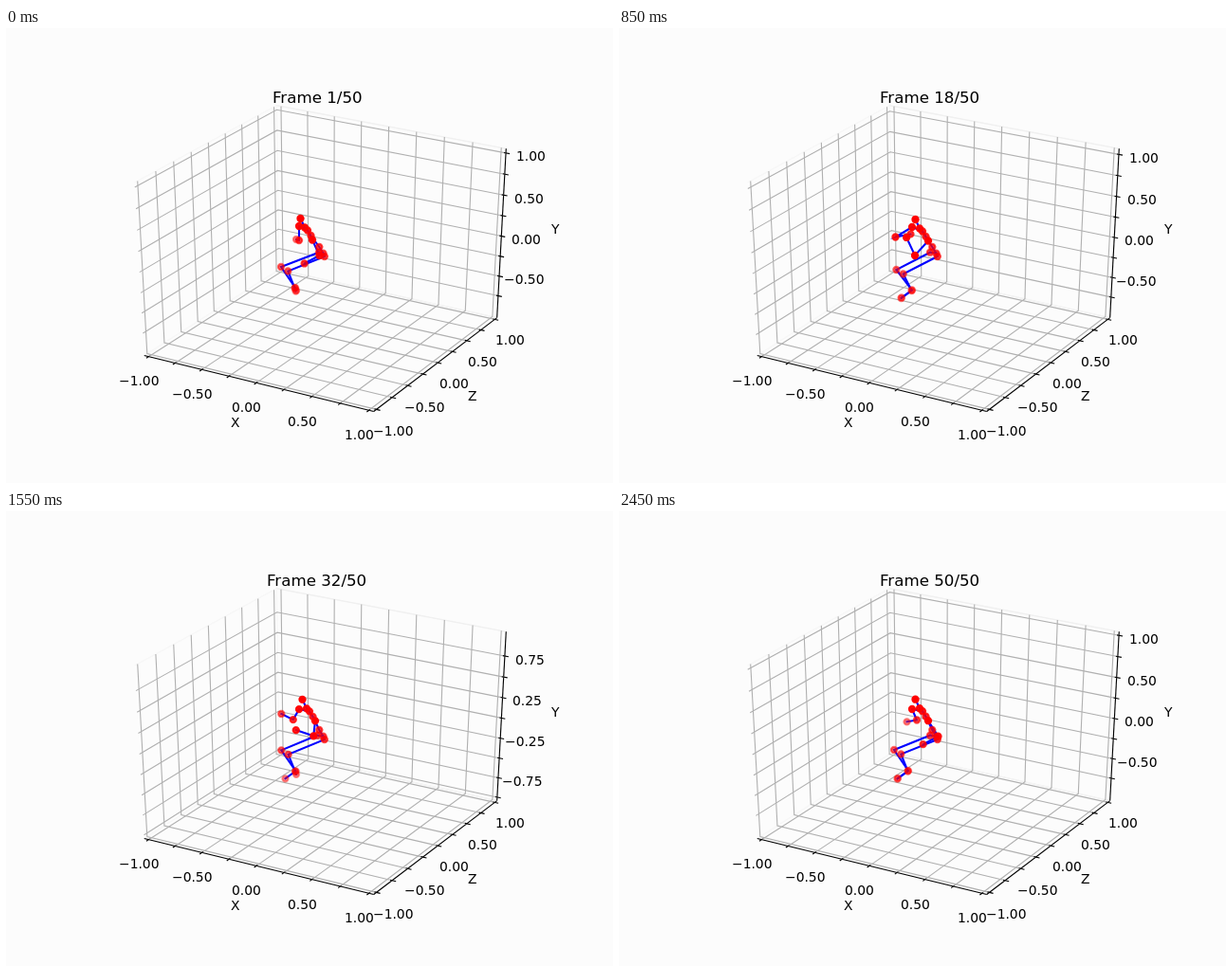
Write an HTML page with a canvas that moves like this. It is 640x480 px and loops after 2500 ms.

```html
<!DOCTYPE html>
<html lang="en">
<head>
<meta charset="utf-8">
<title>3D pose plot</title>
<style>
html, body { margin: 0; width: 100%; height: 100%; overflow: hidden; background: #fcfcfc; }
canvas { display: block; }
</style>
</head>
<body>
<canvas id="plot" width="640" height="480"></canvas>
<script>
const ctx = document.getElementById('plot').getContext('2d');
const STEP = 50, COUNT = 50;
const PT = 100 / 72;

const clamp = u => Math.max(0, Math.min(1, u));
const mix = (a, b, u) => a + (b - a) * u;
const add = ([x, y], dx, dy) => [x + dx, y + dy];

// Smooth step from 0 to 1 between two times.
function ramp(t, from, to) {
  const u = clamp((t - from) / (to - from));
  return u * u * (3 - 2 * u);
}

// Perspective view of a unit cube centred on the origin (elev 30, azim -60).
const H = Math.sqrt(3) / 2;
function project([x, y, z]) {
  const depth = 10 - (x * H / 2 - y * .75 + z / 2);
  const u = (x * H + y / 2) / depth;
  const v = (-x / 4 + y * H / 2 + z * H) / depth;
  return [80 + (u + .095) / .185 * 496, 427.2 - (v + .095) / .185 * 369.6];
}

function polyline(points, color, width, cap = 'butt') {
  ctx.beginPath();
  points.forEach(p => ctx.lineTo(p[0], p[1]));
  ctx.strokeStyle = color;
  ctx.lineWidth = width;
  ctx.lineCap = cap;
  ctx.stroke();
}
const edge = (color, width, ...pts) => polyline(pts.map(project), color, width);

// Centred text on whole pixels.
function text(str, x, baseline, size = 10) {
  ctx.font = `${size * PT}px "DejaVu Sans", sans-serif`;
  ctx.fillStyle = '#000';
  ctx.fillText(str, Math.round(x - ctx.measureText(str).width / 2), Math.round(baseline));
}

const D = 1 / 12;            // axis spacing unit
const S = .5 + D / 4;        // half size of the panes
const L = S + .8857 * D;     // tick labels
const N = S + 1.9255 * D;    // axis names
const IN = .1 * D, OUT = .2 * D;

const AXES = [
  { name: 'X', namePos: [0, -N, -N], line: [[-S, -S, -S], [S, -S, -S]],
    grid: c => [[c, -S, -S], [c, S, -S], [c, S, S]],
    tick: c => [[c, -S + IN, -S], [c, -S - OUT, -S]],
    label: c => [c, -L, -L] },
  { name: 'Z', namePos: [N, 0, -N], line: [[S, -S, -S], [S, S, -S]],
    grid: c => [[S, c, -S], [-S, c, -S], [-S, c, S]],
    tick: c => [[S - IN, c, -S], [S + OUT, c, -S]],
    label: c => [L, c, -L] },
  { name: 'Y', namePos: [N, N, 0], line: [[S, S, -S], [S, S, S]],
    grid: c => [[-S, -S, c], [-S, S, c], [S, S, c]],
    tick: c => [[S - IN, S, c], [S + OUT, S, c]],
    label: c => [L, L, c] }
];

function drawPanes() {
  edge('#f7f7f7', PT, [-S, -S, -S], [-S, S, -S], [-S, S, S], [-S, -S, S]);
  edge('#f0f0f0', PT, [-S, S, -S], [S, S, -S], [S, S, S], [-S, S, S]);
  edge('#f4f4f4', PT, [-S, -S, -S], [S, -S, -S], [S, S, -S], [-S, S, -S]);
}

function drawAxis(axis, centre) {
  const parity = centre < 0 ? 1 : 0;
  const ticks = [];
  for (let k = -5; k <= 5; k++) {
    const c = (k / 4 - centre) / 2;
    if (Math.abs(c) <= .5) ticks.push([k, c]);
  }
  edge('#000', .8 * PT, ...axis.line);
  ticks.forEach(([, c]) => edge('#b0b0b0', .8 * PT, ...axis.grid(c)));
  ticks.forEach(([k, c]) => {
    edge('#000', .8 * PT, ...axis.tick(c));
    if (Math.abs(k) % 2 !== parity) return;
    const [x, y] = project(axis.label(c));
    text((k / 4).toFixed(2).replace('-', '\u2212'), x, y + 11);
  });
  const [x, y] = project(axis.namePos);
  text(axis.name, x, y + 4);
}

// Centre of the vertical range, which follows the body.
const centreY = t => .01 + .017 * ramp(t, 550, 850) - .02 * ramp(t, 900, 1300)
  - .01 * ramp(t, 1350, 1550) + .009 * ramp(t, 1580, 1750) - .003 * ramp(t, 1800, 2400);

const armRaise = t => ramp(t, 550, 850) - ramp(t, 1380, 1720);

// The seated body leans and straightens, the arms lift and drop, the feet flick.
function pose(t) {
  const lean = ramp(t, 500, 850) - ramp(t, 1200, 1650);
  const forward = 2 * ramp(t, 500, 850);
  const rise = lean - 2.3 * ramp(t, 850, 1500);
  const raise = armRaise(t);
  const relax = ramp(t, 1380, 1720);

  const upper = (x, y) => [x + forward, y + rise];
  const p = {
    head: upper(310.5, 201),
    chin: upper(315, 210.5),
    neck: upper(318, 213.5),
    chest: upper(321.5, 219),
    spine: [330.3, 231],
    pelvis: [334.5, 237.7],
    shoulderR: [309, 209 + lean],
    shoulderL: add(upper(323, 223.5), forward / 2, 0),
    hipR: [330 - forward, 236.7],
    hipL: [335.8, 241]
  };

  p.elbowR = add(p.shoulderR, -17.5 * raise + 5 * relax, 15 - 4.5 * raise - 3.5 * relax);
  const turn = -Math.PI / 180 * (20 + 185 * clamp((t - 850) / 950) ** 1.5);
  const reach = ramp(t, 550, 850) - .4 * ramp(t, 1800, 2450);
  p.wristR = add(p.elbowR, mix(-3, 17 * Math.cos(turn), reach), mix(-1, 9 * Math.sin(turn), reach));

  p.elbowL = add(p.shoulderL, 7.5 - 21.5 * raise + 3 * relax, 16.5 - raise);
  const bend = Math.PI / 180 * (152 + 93 * raise);
  const forearm = 18 + 3 * raise;
  p.wristL = add(p.elbowL, forearm * Math.cos(bend), forearm * Math.sin(bend));

  const leg = (side, x, y, ankleX, ankleY, flick) => {
    p['knee' + side] = [x + 2.4 * lean, y + 3 * lean];
    p['ankle' + side] = [ankleX + 4 * lean, ankleY + 2.5 * lean];
    p['foot' + side] = add(p['ankle' + side], mix(1, -11, flick), mix(3, 8, flick));
  };
  leg('R', 290, 252, 305, 274, ramp(t, 50, 400) - ramp(t, 1150, 1350) + ramp(t, 1400, 1550));
  leg('L', 297.3, 256.5, 304.5, 274.5, ramp(t, 500, 800) - ramp(t, 1100, 1300) + ramp(t, 1600, 1800));
  return p;
}

// Each chain fades from its first joint to its last.
const CHAINS = [
  { joints: 'hipR kneeR ankleR footR', from: .65, to: () => .42 },
  { joints: 'hipL kneeL ankleL footL', from: .7, to: () => .42 },
  { joints: 'shoulderR elbowR wristR', from: .95, to: a => mix(.45, .75, a) },
  { joints: 'head chin neck chest spine pelvis', from: 1, to: () => .65 },
  { joints: 'shoulderL elbowL wristL', from: 1, to: a => mix(.75, 1, a) }
].map(c => ({ ...c, joints: c.joints.split(' ') }));

const LINKS = ['pelvis hipR', 'pelvis hipL', 'neck shoulderR', 'neck shoulderL'].map(s => s.split(' '));

function drawPose(t) {
  const p = pose(t);
  [...LINKS, ...CHAINS.map(c => c.joints)].forEach(names =>
    polyline(names.map(n => p[n]), '#00f', 1.5 * PT, 'square'));
  CHAINS.forEach(({ joints, from, to }) => joints.forEach((name, i) => {
    const alpha = mix(from, to(armRaise(t)), i / (joints.length - 1));
    ctx.beginPath();
    ctx.arc(...p[name], Math.sqrt(20) / 2 * PT, 0, 2 * Math.PI);
    ctx.fillStyle = ctx.strokeStyle = `rgba(255, 0, 0, ${alpha})`;
    ctx.lineWidth = 1.5 * PT;
    ctx.fill();
    ctx.stroke();
  }));
}

function draw(now) {
  const n = Math.floor(now / STEP) % COUNT;
  const t = n * STEP;
  ctx.fillStyle = '#fcfcfc';
  ctx.fillRect(0, 0, 640, 480);
  drawPanes();
  AXES.forEach(axis => drawAxis(axis, axis.name === 'Y' ? centreY(t) : 0));
  drawPose(t);
  text(`Frame ${n + 1}/${COUNT}`, 328, 79, 12);
}

const start = performance.now();
function loop() {
  draw(performance.now() - start);
  requestAnimationFrame(loop);
}
loop();
</script>
</body>
</html>
```
